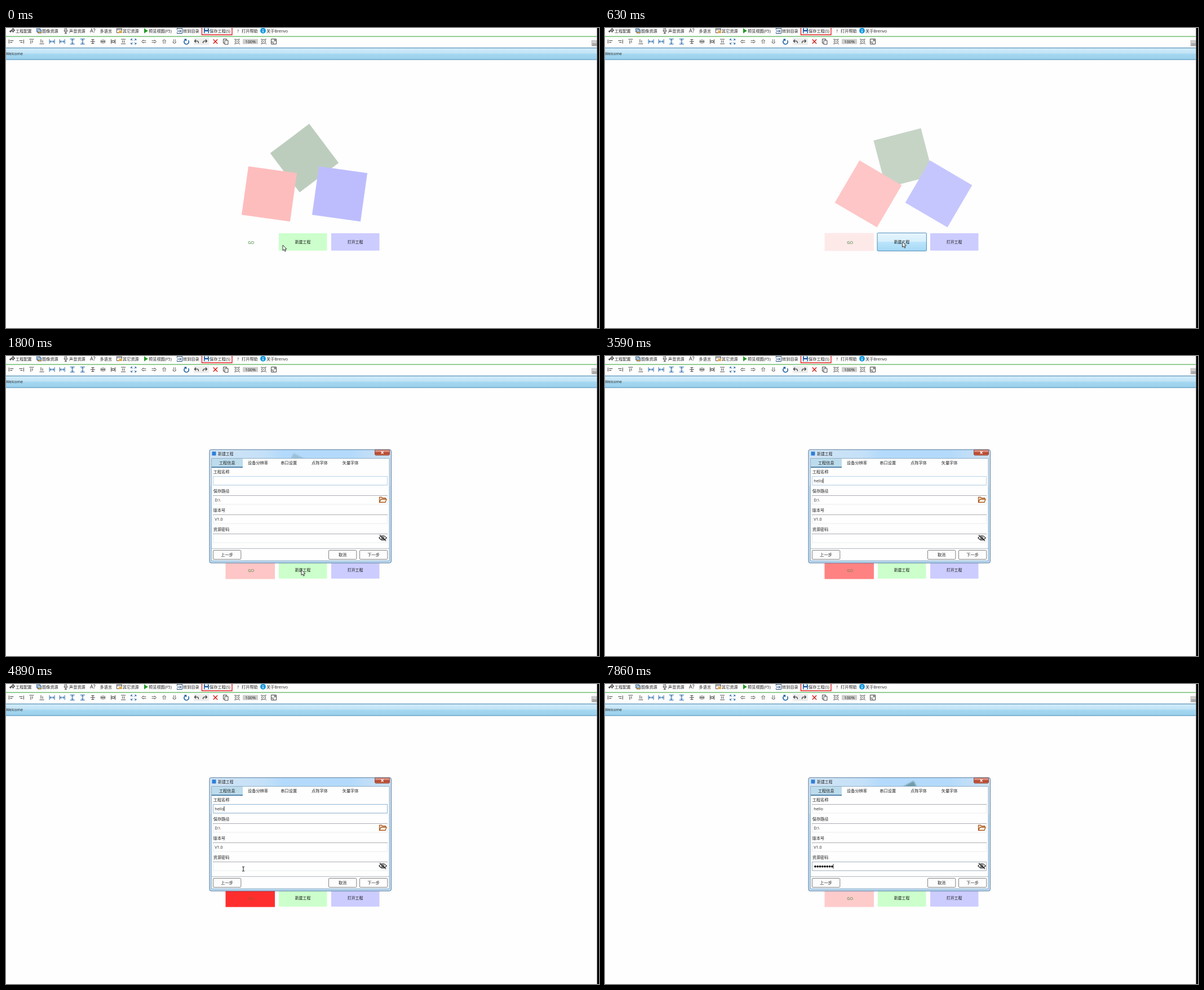
Animation, 1052 px wide and 532 px high, one loop 8 s. Source, as an HTML page:

```html
<!DOCTYPE html>
<html lang="zh-CN">
<head>
<meta charset="utf-8">
<title>Welcome</title>
<style>
html, body { margin: 0; width: 100%; height: 100%; overflow: hidden; background: #fefefe; }
svg { display: block; width: 1052px; height: 532px; }
text { font: 7.2px "Open Sans", "Noto Sans CJK SC", "Noto Sans CJK", sans-serif; fill: #222; white-space: pre; }
.mid { text-anchor: middle; }
.btn { font-size: 6.9px; fill: #111; }
.line { fill: none; stroke: #444; stroke-width: 1; }
.blue { stroke: #1d62a5; }
.box { fill: #fff; stroke: #e3e6ea; stroke-width: .8; }
</style>
</head>
<body>
<svg viewBox="0 0 1052 532">
  <defs>
    <linearGradient id="bar" x2="0" y2="1">
      <stop offset="0" stop-color="#d3ecf9"/><stop offset=".48" stop-color="#bfe3f6"/>
      <stop offset=".5" stop-color="#a5d7f1"/><stop offset="1" stop-color="#9acfec"/>
    </linearGradient>
    <linearGradient id="hot" x2="0" y2="1">
      <stop offset="0" stop-color="#e6f5fd"/><stop offset=".5" stop-color="#d6effc"/>
      <stop offset=".5" stop-color="#bce5fc"/><stop offset="1" stop-color="#a5d8f4"/>
    </linearGradient>
    <linearGradient id="glass">
      <stop offset="0" stop-color="#d2e5f5"/><stop offset=".3" stop-color="#c4e0f8"/>
      <stop offset=".4" stop-color="#b4dafb"/><stop offset=".78" stop-color="#b4dafb"/>
      <stop offset="1" stop-color="#cfe3f3"/>
    </linearGradient>
    <linearGradient id="close" x2="0" y2="1">
      <stop offset="0" stop-color="#e2a598"/><stop offset=".48" stop-color="#cd6f5c"/>
      <stop offset=".5" stop-color="#b53a22"/><stop offset="1" stop-color="#cc6a4e"/>
    </linearGradient>
    <clipPath id="titleClip"><path d="M363 167H682V181H363Z"/></clipPath>
  </defs>

  <g id="menu"></g>
  <path d="M0 15H1048" stroke="#6fbf6f" stroke-width="1.4"/>
  <g id="tools"></g>
  <path d="M1039 22H1048V32H1039Z" fill="#cfcfcf" stroke="#aaa" stroke-width=".6"/>
  <path d="M1040 27H1048V32H1040Z" fill="#a9a9a9"/>

  <path d="M0 35H1048V56.5H0Z" fill="url(#bar)"/>
  <path d="M0 35.3H1048M0 56H1048" stroke="#5a93ba" stroke-width="1.2"/>
  <text x="0" y="48.3" style="font-size:7px">Welcome</text>
  <path d="M1048.5 0H1052V532H1048.5Z"/>

  <g id="squares">
    <path class="sq" fill="#004000" data-x="529.4" data-y="230.6" data-a="-37"/>
    <path class="sq" fill="#f00" data-x="467" data-y="294.2" data-a="8"/>
    <path class="sq" fill="#00f" data-x="592" data-y="294.2" data-a="8"/>
  </g>

  <path id="go" d="M389.5 363.5H477V395.5H389.5Z" fill="#f00"/>
  <text id="goText" class="mid" x="434.7" y="382.8" style="fill:#2a7a2a">GO</text>
  <path d="M484 364H569.5V394.7H484Z" fill="#cfc"/>
  <rect id="hover" x="483" y="363.4" width="87.4" height="32" rx="1.5" fill="url(#hot)" stroke="#4f8db8"/>
  <text class="mid btn" x="526.5" y="382.3">新建工程</text>
  <path d="M577 364H662.5V394.7H577Z" fill="#ccf"/>
  <text class="mid btn" x="619.6" y="382.3">打开工程</text>

  <g id="dialog">
    <rect x="361" y="166" width="322.4" height="201" rx="3" fill="url(#glass)" stroke="#56789a"/>
    <path d="M362 230V366H682V230Z" fill="#b9d9f2"/>
    <g clip-path="url(#titleClip)">
      <path id="ghost" class="sq" fill="#123c2c" data-x="529.4" data-y="230.6" data-a="-37" style="filter:blur(.8px)"/>
    </g>
    <path d="M364.5 181.5H680V363H364.5Z" fill="#fefefe" stroke="#7f9db5" stroke-width=".8"/>
    <path d="M365.5 169.5h7v7h-7Z" fill="#2f7fd8"/>
    <text x="376" y="176" style="font-size:6.9px">新建工程</text>
    <path d="M654.5 166.5H680.5V174q0 2-2 2H656.500q-2 0-2-2Z" fill="url(#close)" stroke="#7b3b33" stroke-width=".8"/>
    <path d="M665.6 169l4 4.400m0-4.400l-4 4.400" stroke="#fff" stroke-width="1.3"/>
    <path d="M365 182H420V198H365Z" fill="#bcdcec"/>
    <path d="M365 197.300H420" stroke="#2c6796" stroke-width="1.5"/>
    <g id="form"></g>
    <path id="focus" d="M367.5 213.500H676.500V229H367.500Z" fill="none"/>
    <path d="M365 341.400H680" stroke="#a8b0b6" stroke-width=".9"/>
    <path d="M662.500 259.500V250.500h4l1.500 1.500h5.500v2M662.500 259.500l2.500-5.500h10l-2 5.500Z" fill="#fff3e4" stroke="#a9581c" stroke-width="1.3"/>
    <g fill="none" stroke="#222" stroke-width="1.200">
      <path d="M662 322.500q6.500-8 13 0q-6.500 8-13 0Z"/>
      <circle cx="668.500" cy="322.500" r="2"/>
      <path d="M663 317.500l11 10.500"/>
    </g>
    <text id="name" x="370.300" y="223.800"></text>
    <g id="dots"></g>
    <path id="caret" d="M0 0V8.500" stroke="#111" stroke-width=".9"/>
  </g>

  <circle id="click" cx="531" cy="380" r="6" fill="#efe600" opacity=".72"/>
  <path id="arrow" d="M0 0V9.600l2.200-2 1.600 3.500 1.600-.7-1.500-3.400h3Z" fill="#fff" stroke="#222" stroke-width=".9"/>
  <path id="beam" class="line" d="M-2-4q1.500 0 2 .7q.5-.7 2-.7M0-3.500V3.500M-2 4q1.500 0 2-.7q.5.700 2 .7" style="stroke:#111"/>
</svg>

<script>
const $ = id => document.getElementById(id);
const NS = 'http://www.w3.org/2000/svg';

function add(parent, tag, attrs, text) {
  const el = document.createElementNS(NS, tag);
  for (const k in attrs) el.setAttribute(k, attrs[k]);
  if (text) el.textContent = text;
  return parent.appendChild(el);
}
const icon = (parent, x, y, d, style = '', cls = 'line') =>
  add(parent, 'path', { class: cls, d, style, transform: `translate(${x} ${y})` });

// Menu row
const menu = $('menu');
const labels = {
  17: '工程配置', 64: '图像资源', 112: '声音资源', 166.5: '多语言', 207: '其它资源',
  253: '预览视图(F5)', 314: '转到目录', 361: '保存工程(S)', 410: '?', 418: '打开帮助', 462: '关于Brenvo'
};
for (const x in labels) add(menu, 'text', { x, y: 7.8 }, labels[x]);
add(menu, 'text', { x: 149, y: 8, style: 'font-size:9px' }, 'A?');
icon(menu, 12.5, 4, 'M-1.800 0a1.800 1.800 0 1 0 3.600 0a1.800 1.800 0 1 0-3.600 0M0-4V-2M0 2V4M-3.500 0H-2M2 0H3.500', 'stroke-width:1.400');
icon(menu, 8, 6, 'M-1 0a1 1 0 1 0 2 0a1 1 0 1 0-2 0M0-2V2M-2 0H2');
icon(menu, 58.5, 5, 'M-4-4H2V2H-4ZM-2-2H4V4H-2Z', 'fill:#dfeaf5;stroke:#35648f');
icon(menu, 58.5, 5, 'M-2 4l2-3 1.500 1.500 1-1L4 4Z', 'fill:#d89020;stroke:none');
icon(menu, 106, 4.5, 'M-1.300-5V0q1.300 2.500 2.600 0V-5ZM-3-1q0 4 3 4t3-4M0 3V5M-2 5H2');
icon(menu, 201, 5, 'M-4.500-4H4.500V3.500H-4.500ZM-4.500-2H4.500', 'stroke:#555');
icon(menu, 203, 7, 'M-2.500-2H3V2H-2.500Z', 'fill:#e9a33b;stroke:none');
icon(menu, 245, 5, 'M0-4.500L7 0L0 4.500Z', 'fill:#239b23;stroke:none');
icon(menu, 308, 5, 'M-1-4.500H4.500V4.500H-4.500V2.500M-4.500-1.500V-4.500H0M-4.500.500H2M0-2l2.500 2.500L0 3', 'stroke:#234f7e');
icon(menu, 374, 5, 'M-26.500-8H27V7H-26.500Z', 'stroke:#e02020;stroke-width:1.400');
icon(menu, 355.5, 5, 'M-4.500-4.500H3.500L4.500-3.500V4.500H-4.500Z', 'fill:#1d5fa8;stroke:none');
icon(menu, 355.5, 5, 'M-2.500-4.500H2.500V-1.500H-2.500ZM-3 1H3V4.500H-3Z', 'fill:#fff;stroke:none');
add(menu, 'circle', { cx: 456, cy: 4.8, r: 5, fill: '#159ae0' });
icon(menu, 456, 5, 'M0-3V-1.800M0-.8V3', 'stroke:#fff;stroke-width:1.300');

// Icon row
const tools = $('tools');
const wide = 'M-4.500-4V4M4.500-4V4M-3.500 0H3.500M-1.500-2L-3.500 0l2 2M1.500-2L3.500 0l-2 2';
const tall = 'M-4-4.500H4M-4 4.500H4M0-3.500V3.500M-2-1.500L0-3.500l2 2M-2 1.500L0 3.500l2-2';
const arrow = 'M-4 0L-.5-3.500M-4 0L-.5 3.500M-2.500-1.500H4M-2.500 1.500H4';
[
  'M-4-3.500V3.500M-2-1.500H4M-2 1.500H2', 'M4-3.500V3.500M2-1.500H-4M2 1.500H-2',
  'M-4-4H4M-1.500-2V4M1.500-2V2', 'M-4 4H4M-1.500 2V-4M1.500 2V-2',
  wide, wide, tall, tall,
  'M-4 0H4M-2.500-3.500H2.500M-2.500 3.500H2.500M0-3V3', 'M0-4V4M-3-3V3M3-3V3M-4.500 0H4.500',
  'M-3.500-4V4M3.500-4V4M-2-1.500H2V1.500H-2Z', 'M-4-4H4M-4 4H4M-1.500-2V2M1.500-2V2',
  'M-4.500-2V-4.500H-2M2-4.500H4.500V-2M4.500 2V4.500H2M-2 4.500H-4.500V2M-4-4l2.500 2.500M4-4L1.500-1.500M4 4L1.500 1.500M-4 4l2.500-2.500'
].forEach((d, i) => icon(tools, 9.3 + i * 18.08, 24, d, '', i > 3 && i < 8 || i === 12 ? 'line blue' : 'line'));
[0, 180, 90, -90].forEach((turn, i) => {
  const a = icon(tools, 0, 0, arrow, 'stroke-width:.8');
  a.setAttribute('transform', `translate(${244.5 + i * 18.08} 24) rotate(${turn})`);
});
icon(tools, 320, 24.5, 'M3.500-2.500A4.200 4.200 0 1 1-1-4M-3.500-4.500H-.5V-1.500', 'stroke-width:1.600', 'line blue');
icon(tools, 346, 24, 'M-13-6H14V6H-13Z', 'fill:#ededed;stroke:none');
const curl = 'M-3.500-.8H1q2.500 0 2.500 3.800M-1-3.500L-3.500-.8L-1 1.800';
icon(tools, 338, 24, curl, 'stroke-width:1.300');
icon(tools, 353, 24, curl, 'stroke-width:1.300').setAttribute('transform', 'translate(353 24) scale(-1 1)');
icon(tools, 371.5, 24, 'M-3.700-3.700L3.700 3.700M3.700-3.700L-3.700 3.700', 'stroke:#d0201c;stroke-width:1.500');
icon(tools, 390, 24, 'M-2-2H4V5H-2ZM-2 3H-4.500V-4.500H1.500V-2');
icon(tools, 433.5, 24, 'M-13.500-4.500H13.500V4.500H-13.500Z', 'fill:#cdcdcd;stroke:none');
add(tools, 'text', { x: 433.7, y: 26.7, class: 'mid' }, '100%');
for (const x of [410, 457])
  icon(tools, x, 24, 'M-3.500 0a3.500 3.500 0 1 0 7 0a3.500 3.500 0 1 0-7 0M-1.500 0H1.500M2.500 2.500L5 5M-5-4H-2M2-4H5M-5 4H-2', 'stroke-width:.9');
icon(tools, 475, 24, 'M-4.500-4.500H4.500V4.500H-4.500ZM-4.500 1H-1V4.500M0 0L3-3M.500-3H3V-.500');

// Dialog form
const form = $('form');
['工程信息', '设备分辨率', '串口设置', '点阵字体', '矢量字体'].forEach((s, i) =>
  add(form, 'text', { x: 392.3 + i * 54.7, y: 192.3, class: 'mid' }, s));
['工程名称', '保存路径', '版本号', '资源密码'].forEach((s, i) => {
  const y = 213.5 + i * 34;
  add(form, 'text', { x: 367.7, y: y - 5.3 }, s);
  add(form, 'path', { class: 'box', d: `M367.500 ${y}H676.500V${y + 15.500}H367.500Z` });
  add(form, 'path', { d: `M367 ${y}H677`, stroke: '#abadb3', 'stroke-width': 1 });
  add(form, 'text', { x: 370.3, y: y + 10.5 }, ['', 'D:\\', 'V1.0', ''][i]);
});
[[367.500, '上一步'], [572.500, '取消'], [627.500, '下一步']].forEach(([x, s]) => {
  add(form, 'rect', { x, y: 344.5, width: 49.300, height: 16, rx: 1.500, fill: '#fdfdfd', stroke: '#777', 'stroke-width': .9 });
  add(form, 'text', { x: x + 24.600, y: 355, class: 'mid' }, s);
});
const dots = Array.from({ length: 8 }, (_, i) =>
  add($('dots'), 'circle', { cx: 373 + i * 4.270, cy: 323.6, r: 1.850, fill: '#111' }));

// Timeline
const LOOP = 8000;
const ticks = [0, 150, 310, 470, 630, 820, 980, 1140, 1310, 1470, 1640, 1800, 1970, 2130, 2290,
  2600, 2770, 2940, 3260, 3430, 3590, 3920, 4230, 4400, 4560, 4730, 4890, 5060, 5230,
  5560, 5720, 5890, 6060, 6220, 6550, 6870, 7030, 7200, 7520, 7860];
const typed = [2600, 2940, 3260, 3430, 3590];
const dotted = [5560, 5890, 6220, 6550, 6870, 7200, 7520, 7860];
const goFade = [[0, 0], [470, .07], [820, .1], [1800, .22], [3590, .49], [4890, .82], [5060, .79], [6220, .43], [7860, .2]];
const squareFade = [[0, .25], [470, .225], [2940, .1], [4900, 0], [6220, 0], [7860, .4]];
const hoverFade = [[0, 0], [150, .3], [470, 1], [630, 1], [820, .5], [980, 0]];
const moveX = [[0, 491], [150, 505], [310, 522], [470, 530.5], [820, 524], [4230, 524], [4890, 421]];
const moveY = [[0, 385], [310, 379], [4230, 379], [4890, 328]];

function at(keys, t) {
  const i = keys.findIndex(k => k[0] > t);
  if (i < 0) return keys[keys.length - 1][1];
  const [t0, a] = keys[i - 1], [t1, b] = keys[i];
  return a + (b - a) * (t - t0) / (t1 - t0);
}
const count = (times, t) => times.filter(x => x <= t).length;
const show = (id, on) => { $(id).style.display = on ? '' : 'none'; };
const squares = document.querySelectorAll('.sq');
squares.forEach(s => s.setAttribute('d', 'M-43.400-43.400H43.400V43.400H-43.400Z'));

function draw(t) {
  for (const s of squares) {
    const { x, y, a } = s.dataset;
    s.setAttribute('transform', `translate(${x} ${y}) rotate(${+a + t * .0355})`);
  }
  const fade = at(squareFade, t), go = at(goFade, t);
  $('squares').style.opacity = fade;
  $('ghost').style.opacity = fade;
  $('go').style.opacity = go;
  $('goText').style.opacity = 1 - go * .6;
  $('hover').style.opacity = at(hoverFade, t);

  show('dialog', t >= 820);
  const opening = t < 980;
  $('dialog').style.opacity = opening ? .9 : 1;
  $('dialog').setAttribute('transform', opening ? 'translate(522 264.500) scale(.975 .966) translate(-522 -266.500)' : '');

  const letters = count(typed, t), stars = count(dotted, t), inName = t < 5230;
  $('name').textContent = 'hello'.slice(0, letters);
  dots.forEach((d, i) => { d.style.display = i < stars ? '' : 'none'; });
  const since = inName ? (letters ? typed[letters - 1] : 820) : (stars ? dotted[stars - 1] : 5230);
  show('caret', Math.floor((t - since) / 530) % 2 === 0);
  const end = inName
    ? 370.500 + (letters ? $('name').getComputedTextLength() : 0)
    : 370.800 + stars * 4.270;
  $('caret').setAttribute('transform', `translate(${end} ${inName ? 217 : 319})`);
  $('focus').setAttribute('transform', `translate(0 ${inName ? 0 : 102})`);
  $('focus').setAttribute('stroke', inName ? (t < 4560 ? '#b5d3e8' : '#8db4d2') : '#a5b3bf');

  const x = at(moveX, t), y = at(moveY, t);
  const visible = t < 2290 || (t >= 4230 && t < 5560);
  const text = t >= 4230 && y > 315 && y < 332;
  show('arrow', visible && !text);
  show('beam', visible && text);
  for (const id of ['arrow', 'beam']) $(id).setAttribute('transform', `translate(${x} ${y})`);
  show('click', t >= 470 && t < 630);
}

const start = performance.now();
let last = -1;
function loop() {
  const now = (performance.now() - start) % LOOP;
  const t = ticks[count(ticks, now) - 1];
  if (t !== last) draw(last = t);
  requestAnimationFrame(loop);
}
loop();
</script>
</body>
</html>
```
